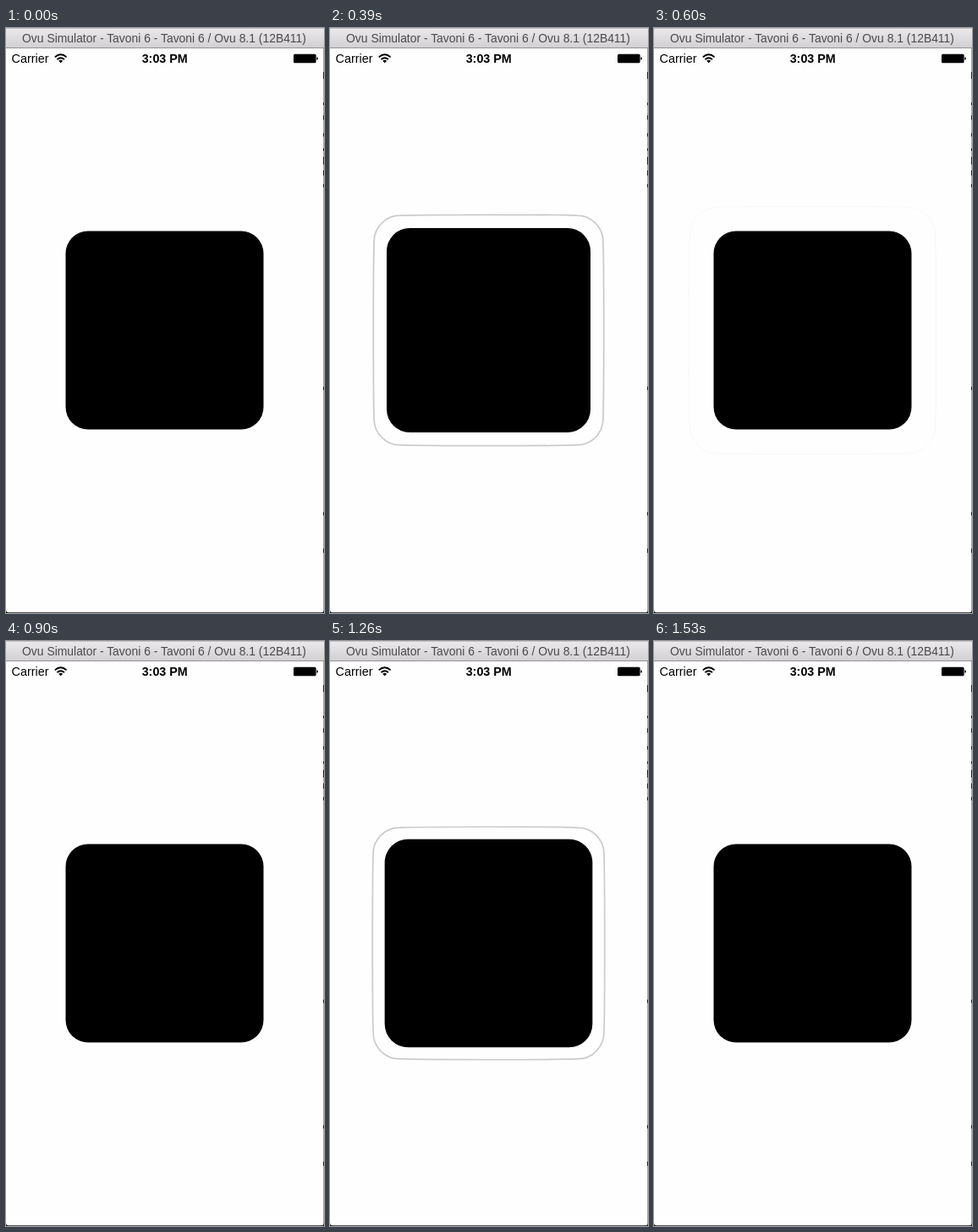
These frames come from a looping animation (376x690 px, 1560 ms). An HTML page:

```html
<!DOCTYPE html>
<html lang="en">
<head>
<meta charset="utf-8">
<title>Pulse button</title>
<style>
  html, body { margin: 0; width: 100%; height: 100%; overflow: hidden; background: #fefefe; }
  svg { display: block; width: 376px; height: 690px; }
  text { font-family: "Liberation Sans", Arial, sans-serif; }
</style>
</head>
<body>
<svg viewBox="0 0 376 690">
  <defs>
    <linearGradient id="bar" x2="0" y2="1">
      <stop offset="0" stop-color="#ebe9eb"/>
      <stop offset="1" stop-color="#d2d0d2"/>
    </linearGradient>
  </defs>
  <rect width="376" height="690" fill="#fefefe"/>

  <!-- window frame -->
  <rect width="376" height="23" fill="url(#bar)"/>
  <path d="M0 .5H376" stroke="#c4c2c4"/>
  <path d="M0 23.5H376" stroke="#959395"/>
  <path d="M375.5 24V690" stroke="#a8a8a8"/>
  <path d="M375.5 52v8M375.5 88v3M375.5 103v5M375.5 124v4M375.5 142v3M375.5 152v9M375.5 168v6M375.5 184v4M375.5 423v4M375.5 571v4M375.5 614v5" stroke="#222"/>
  <path d="M0 689.5H376" stroke="#555"/>
  <path d="M0 686Q0 690 4 690H0ZM376 686Q376 690 372 690H376Z" fill="#111"/>
  <text x="187" y="17" font-size="13.9" text-anchor="middle" fill="#4b4a4b">Ovu Simulator - Tavoni 6 - Tavoni 6 / Ovu 8.1 (12B411)</text>

  <!-- status bar -->
  <text x="6.5" y="41" font-size="14.4">Carrier</text>
  <g fill="none" stroke="#000" stroke-width="1.9">
    <path d="M57.8 34.4Q64.7 28.2 71.6 34.4"/>
    <path d="M60.4 37.1Q64.7 33.3 69 37.1"/>
  </g>
  <path d="M62.2 38.7Q64.7 36.7 67.2 38.7L64.7 41.3Z"/>
  <text x="187.7" y="41" font-size="14.3" font-weight="bold" text-anchor="middle">3:03 PM</text>
  <rect x="340" y="30.8" width="26.6" height="10.4" rx="1.5"/>
  <path d="M367.4 34.2Q369 34.5 369 36T367.4 37.8Z"/>

  <!-- button -->
  <path id="ring" fill="none" stroke="#000"/>
  <rect id="button"/>
</svg>
<script>
const LOOP = 1560, STEP = 30;
const CENTER = { x: 187.5, y: 356.5 }, HALF = 117, RADIUS = 26.5;
const RING_TIME = 400;
const taps = [
  { grow: 160, grown: 310, shrink: 320, rest: 480, ring: 270 },
  { grow: 1115, grown: 1260, shrink: 1270, rest: 1430, ring: 1130 }
];
const ring = document.getElementById('ring');
const button = document.getElementById('button');

const clamp = v => Math.min(1, Math.max(0, v));
const smooth = (t, from, to) => (1 - Math.cos(Math.PI * clamp((t - from) / (to - from)))) / 2;
const setAll = (node, attrs) => {
  for (const name in attrs) node.setAttribute(name, attrs[name]);
};

// Rounded square whose sides bow out slightly.
function ringPath(half, radius) {
  const a = half - 0.8, b = a - radius, c = half + 0.27, m = b * 0.7;
  const corner = `A${radius} ${radius} 0 0 1 `;
  return `M${-b} ${-a}C${-m} ${-c} ${m} ${-c} ${b} ${-a}${corner}${a} ${-b}` +
    `C${c} ${-m} ${c} ${m} ${a} ${b}${corner}${b} ${a}` +
    `C${m} ${c} ${-m} ${c} ${-b} ${a}${corner}${-a} ${b}` +
    `C${-c} ${m} ${-c} ${-m} ${-a} ${-b}${corner}${-b} ${-a}Z`;
}

function draw(t) {
  const tap = t < 900 ? taps[0] : taps[1];

  const swell = smooth(t, tap.grow, tap.grown) - smooth(t, tap.shrink, tap.rest);
  const scale = 1 + 0.05 * swell, half = HALF * scale;
  setAll(button, {
    x: CENTER.x - half, y: CENTER.y - half,
    width: 2 * half, height: 2 * half, rx: RADIUS * scale
  });

  const p = clamp((t - tap.ring) / RING_TIME);
  const spread = 1 + 0.25 * (1 - (1 - p) ** 3);
  setAll(ring, {
    d: ringPath(HALF * spread, RADIUS * spread),
    transform: `translate(${CENTER.x} ${CENTER.y})`,
    'stroke-width': Math.max(0.6, 2.6 - 2.7 * p),
    'stroke-opacity': p > 0 ? 0.2 * clamp((0.9 - p) / 0.3) : 0
  });
}

function frame() {
  const t = performance.now() % LOOP;
  draw(Math.floor(t / STEP) * STEP);
  requestAnimationFrame(frame);
}
frame();
</script>
</body>
</html>
```
